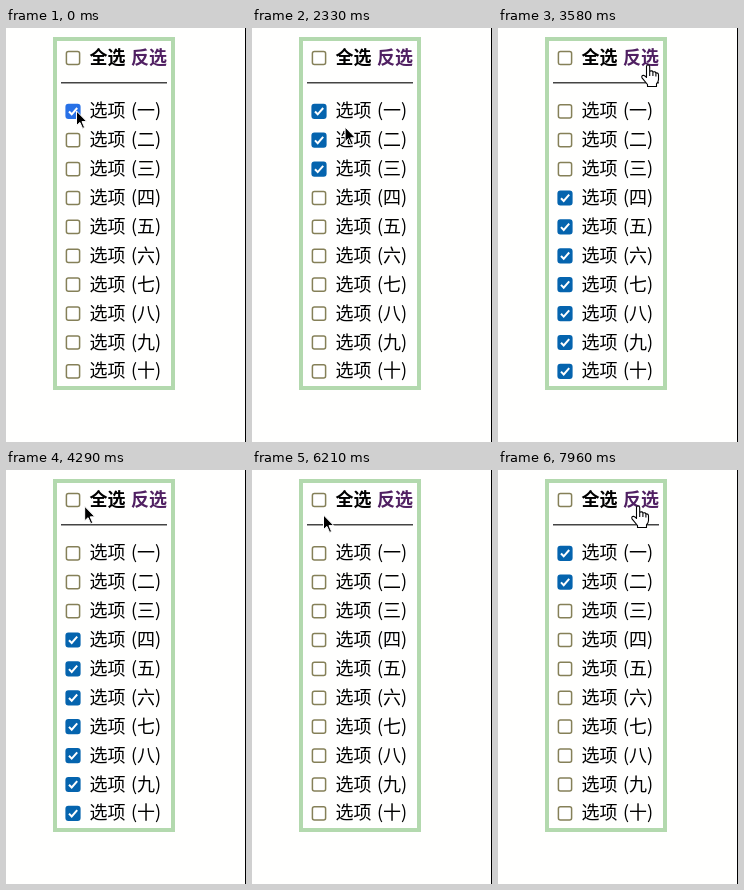
An HTML page that plays this animation: 240 px wide and 414 px high, repeating every 8 s.

```html
<!DOCTYPE html>
<html lang="zh-CN">
<head>
<meta charset="utf-8">
<title>全选 / 反选</title>
<style>
  html, body { margin: 0; width: 100%; height: 100%; overflow: hidden; background: #fffffe; }
  svg { display: block; }
  text { font: 18px "Noto Sans CJK SC", "Noto Sans CJK", sans-serif; fill: #000; }
  .bold { font-weight: 700; }
  .link { fill: #502062; }
  .box rect { fill: #fff; stroke: #858058; stroke-width: 1.5; }
  .box path { fill: none; stroke: #fff; stroke-width: 2; visibility: hidden; }
  .on rect { fill: #0564ae; stroke: #0564ae; stroke-width: 2; }
  .on path { visibility: visible; }
  .on.hover rect { fill: #2871e6; stroke: #2871e6; }
</style>
</head>
<body>
<svg width="240" height="414" viewBox="0 0 240 414">
  <rect x="49" y="11" width="118" height="349" fill="#fffffe" stroke="#b3d9ae" stroke-width="4"/>
  <path d="M239.5 0V414" stroke="#000"/>
  <path d="M55 54.8H161" stroke="#444" stroke-width="1.6"/>
  <g id="list"></g>
  <path id="arrow" d="M.5 1V15.6L3.9 12.4L6.6 18.4L8.6 17.5L6 11.6H10.8Z" stroke="#fff" stroke-width="1"/>
  <path id="hand" d="M-1.5 12.5V1.5Q-1.5 0 0 0T1.7 1.5V6.2Q4.5 5.2 4.9 7Q7.3 6.2 7.9 8Q10.5 7.5 10.5 10V14.5Q10.5 16.5 8.5 18.8V21.5H-.5V19.5L-6 12.8Q-6.8 10.5 -4.5 10.3Q-3 10.6 -1.5 12.5ZM1.7 6V11M4.9 7V11M7.9 8V11.5"
    fill="#fff" stroke="#000" stroke-width="1.1" stroke-linejoin="round"/>
</svg>
<script>
const LOOP = 8000;
const COUNT = 10;
const BOX_X = 67;
const $ = id => document.getElementById(id);

// Box 0 is "select all"
const rowY = i => i ? 83.3 + (i - 1) * 28.9 : 30;

// Places where the pointer rests
const spot = {
  first: [70, 82], second: [67, 108], third: [66, 137],
  all: [67, 35], below: [71, 44],
  linkEdge: [131, 42], link: [150, 37], linkLeft: [140, 36]
};

const toggle = n => s => s.map((v, i) => i === n ? !v : v);
const invert = s => s.map((v, i) => i ? !v : v);
const toggleAll = s => s.map(() => !s[0]);

// Each step: leave, arrive, place, then an optional click after a pause
const step = (leave, arrive, place, pause, act) =>
  ({ leave, arrive, to: spot[place], click: arrive + pause, act });
const steps = [
  step(-1, 0, 'first', 0, toggle(1)),
  step(40, 580, 'second', 250, toggle(2)),
  step(1160, 1580, 'third', 300, toggle(3)),
  step(2050, 2690, 'linkEdge'),
  step(2690, 3080, 'link', 170, invert),
  step(3960, 4390, 'all', 170, toggleAll),
  step(5250, 5500, 'below', -250, toggleAll),
  step(6210, 6600, 'first', 170, toggle(1)),
  step(7030, 7210, 'second', 170, toggle(2)),
  step(7440, 7960, 'linkLeft')
];

function rowMarkup(i) {
  const y = rowY(i);
  const text = (x, str, cls = '') => `<text x="${x}" y="${y + 6}" class="${cls}">${str}</text>`;
  const label = i
    ? text(83.4, '选项') + text(125, `(${'一二三四五六七八九十'[i - 1]})`)
    : text(83.5, '全选', 'bold') + text(125, '反选', 'bold link');
  return `<g class="box" transform="translate(${BOX_X} ${y})">
    <rect x="-6.6" y="-6.6" width="13.2" height="13.2" rx="2"/><path d="M-4 .2L-1.3 3L4.2 -3.3"/></g>${label}`;
}

$('list').innerHTML = Array.from({ length: COUNT + 1 }, (_, i) => rowMarkup(i)).join('');
const boxes = [...document.querySelectorAll('.box')];

const smooth = p => p * p * (3 - 2 * p);

function pointerAt(t) {
  const i = steps.filter(s => s.leave <= t).length - 1;
  const { leave, arrive, to } = steps[i];
  const from = i ? steps[i - 1].to : to;
  const e = smooth(Math.min(1, (t - leave) / (arrive - leave)));
  return from.map((v, k) => v + (to[k] - v) * e);
}

function stateAt(t) {
  return steps
    .filter(s => s.act && s.click <= t)
    .reduce((state, s) => s.act(state), Array(COUNT + 1).fill(false));
}

function draw(t) {
  const [x, y] = pointerAt(t);
  const state = stateAt(t);
  boxes.forEach((box, i) => {
    box.classList.toggle('on', state[i]);
    box.classList.toggle('hover', Math.hypot(x - BOX_X, y - rowY(i)) < 7.5);
  });
  const onLink = x > 124 && x < 162 && y > 17 && y < 42;
  const pointer = onLink ? $('hand') : $('arrow');
  $('arrow').style.display = onLink ? 'none' : '';
  $('hand').style.display = onLink ? '' : 'none';
  pointer.setAttribute('transform', `translate(${x.toFixed(2)} ${y.toFixed(2)})`);
}

const start = performance.now();
function tick() {
  draw((performance.now() - start) % LOOP);
  requestAnimationFrame(tick);
}
tick();
</script>
</body>
</html>
```
